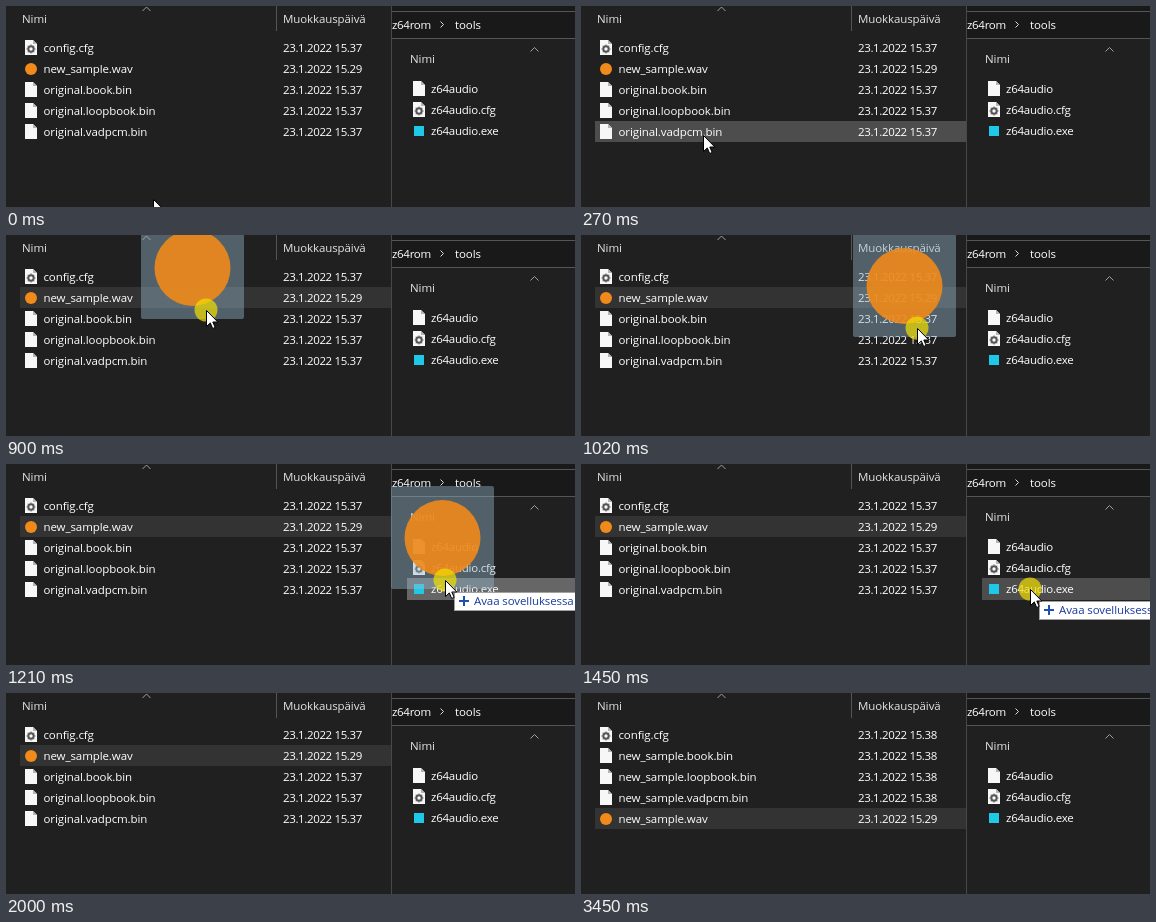
Recreate the animation shown at these times as an HTML page with a canvas. Size 569 by 201 pixels, loop 4.55 s.

```html
<!DOCTYPE html>
<html lang="fi">
<head>
<meta charset="utf-8">
<style>
html, body { margin: 0; width: 569px; height: 201px; overflow: hidden; background: #202020; }
canvas { display: block; }
</style>
</head>
<body>
<canvas id="stage" width="569" height="201"></canvas>
<script>
const g = document.getElementById("stage").getContext("2d");
const LOOP = 4550, ORANGE = "#f08a1a", CYAN = "#20c8e8";

// time, x, y, easing exponent for the way to this point
const path = [
  [30, 147, 193, 1], [300, 118, 118, 1.4], [530, 100, 62, 0.7],
  [720, 100, 62, 1], [780, 101, 62, 1.5], [1020, 335, 93, 1.25],
  [1080, 397, 101, 1], [1210, 439, 116, 0.8], [1300, 449, 125, 0.8],
  [1840, 449, 125, 1], [2000, -14, 168, 1.3]
];
// horizontal offset of the dragged thumbnail from the pointer
const lag = [[780, -67, 0, 1], [1080, -63, 0, 1], [1210, -54, 0, 1]];

function follow(keys, t) {
  if (t <= keys[0][0]) return keys[0].slice(1, 3);
  for (let i = 1; i < keys.length; i++) {
    const [t0, x0, y0] = keys[i - 1], [t1, x1, y1, ease] = keys[i];
    if (t < t1) {
      const k = ((t - t0) / (t1 - t0)) ** ease;
      return [x0 + (x1 - x0) * k, y0 + (y1 - y0) * k];
    }
  }
  return keys[keys.length - 1].slice(1, 3);
}

function rect(x, y, w, h, color) {
  g.fillStyle = color;
  g.fillRect(x, y, w, h);
}

function disc(x, y, r, color) {
  g.fillStyle = color;
  g.beginPath();
  g.arc(x, y, r, 0, 7);
  g.fill();
}

function text(s, x, y, color = "#fff", spacing = "-0.1px") {
  g.font = '11.5px "Open Sans", "Noto Sans", sans-serif';
  g.letterSpacing = spacing;
  g.fillStyle = color;
  g.fillText(s, x, y + 4);
}

function line(points, color) {
  g.strokeStyle = color;
  g.lineWidth = 1;
  g.beginPath();
  points.forEach(([x, y]) => g.lineTo(x, y));
  g.stroke();
}

function sheet(x, y) {
  g.fillStyle = "#f7f7f7";
  g.fill(new Path2D(`M${x - 6} ${y - 8}h8l4 4v11h-12z`));
  g.fillStyle = "#b5b5b5";
  g.fill(new Path2D(`M${x + 2} ${y - 8}v4h4z`));
}

function icon(name, x, y) {
  if (name.endsWith(".wav")) return disc(x, y, 6, ORANGE);
  if (name.endsWith(".exe")) return rect(x - 5, y - 5, 10, 10, CYAN);
  sheet(x, y);
  if (name.endsWith(".cfg")) {
    g.strokeStyle = "#555";
    g.lineWidth = 2;
    g.beginPath();
    g.arc(x, y + 1, 2.7, 0, 7);
    g.stroke();
    for (let i = 0; i < 8; i++) {
      const a = i * Math.PI / 4;
      rect(x - 0.5 + 4 * Math.cos(a), y + 0.5 + 4 * Math.sin(a), 1, 1, "#555");
    }
  }
}

function leftPane(t, py) {
  const done = t >= 3450, stem = done ? "new_sample" : "original";
  const names = ["book", "loopbook", "vadpcm"].map(n => `${stem}.${n}.bin`);
  names.splice(done ? 3 : 0, 0, "new_sample.wav");
  names.unshift("config.cfg");

  rect(0, 0, 385, 201, "#202020");
  rect(270, 0, 1, 25, "#555");
  text("Nimi", 16, 13, "#e4e4e4");
  text("Muokkauspäivä", 277, 13, "#e4e4e4");
  line([[136.5, 5], [140.5, 1], [144.5, 5]], "#a0a0a0");

  names.forEach((name, i) => {
    const y = 42 + 21 * i, wav = name.endsWith(".wav");
    if (t < 560) {
      if (py >= y - 11 && py < y + 10) rect(14, y - 11, 371, 21, "#4d4d4d");
    } else if (wav) rect(14, y - 11, 371, 21, "#333");
    icon(name, 25, y);
    text(name, 37.5, y);
    const minute = wav ? 29 : done ? 38 : 37;
    text(`23.1.2022 15.${minute}`, 277, y, "#fff", "-0.37px");
  });
}

function rightPane(rowColor) {
  rect(385, 0, 184, 201, "#202020");
  rect(386, 0, 183, 33, "#191919");
  rect(386, 5, 183, 1, "#555");
  rect(386, 32, 183, 1, "#555");
  rect(385, 0, 1, 201, "#484848");
  text("z64rom", 386, 19, "#fff", "-0.3px");
  line([[434.5, 15.5], [437.5, 18.5], [434.5, 21.5]], "#ddd");
  text("tools", 449, 19);
  text("Nimi", 404, 53, "#e4e4e4");
  line([[524.5, 45.5], [528.5, 41.5], [532.5, 45.5]], "#a0a0a0");
  if (rowColor) rect(401, 114, 168, 22, rowColor);
  ["z64audio", "z64audio.cfg", "z64audio.exe"].forEach((name, i) => {
    icon(name, 413, 83 + 21 * i);
    text(name, 425, 83 + 21 * i, "#fff", "-0.25px");
  });
}

function thumbnail(x, y, filled) {
  g.fillStyle = "rgba(150,185,205,.42)";
  g.beginPath();
  g.roundRect(x, y, 103, 103, 2);
  g.fill();
  if (filled) disc(x + 51.5, y + 52, 38, "rgba(240,138,26,.9)");
}

function hint(x, y) {
  rect(x, y, 123, 19, "#a0a0a0");
  rect(x + 1, y + 1, 121, 17, "#fff");
  rect(x + 5, y + 8, 10, 2, "#1c50b8");
  rect(x + 9, y + 4, 2, 10, "#1c50b8");
  text("Avaa sovelluksessa", x + 20, y + 9, "#1a3c9e");
}

function pointer(x, y) {
  const arrow = new Path2D("M.5 .5V16.5L4.3 12.9 6.7 18.5 9.2 17.4 6.8 12H11.8Z");
  g.save();
  g.translate(x, y);
  g.fillStyle = "#fff";
  g.fill(arrow);
  g.strokeStyle = "#000";
  g.lineWidth = 1;
  g.stroke(arrow);
  g.restore();
}

function draw(t) {
  const [x, y] = follow(path, t).map(Math.round);
  const hover = t < 2000 && x > 401 && y >= 114 && y < 136;
  leftPane(t, y);
  rightPane(hover && (t < 1450 ? "#666" : "#4d4d4d"));
  if (t >= 750 && t < 1450) {
    thumbnail(x + Math.round(follow(lag, t)[0]), y - 94, t >= 810);
  }
  if (t >= 560 && t < 1480) disc(x, y, 11.5, "rgba(242,222,0,.7)");
  if (hover && t < 1480) hint(x + 9, y + 12);
  if (t < 2000) pointer(x, y);
}

function tick() {
  draw(performance.now() % LOOP);
  requestAnimationFrame(tick);
}
tick();
</script>
</body>
</html>
```
